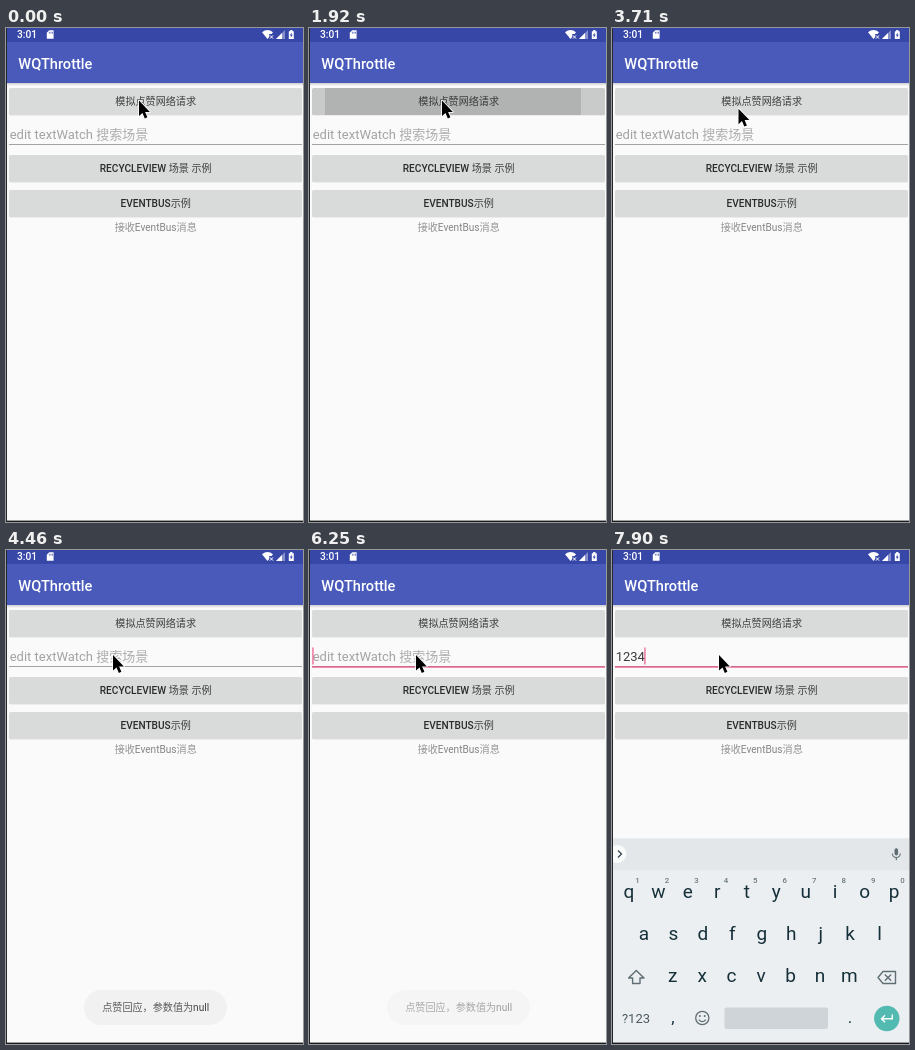
An HTML page for the animation above (8000 ms loop, 297 by 494 pixels).

```html
<!DOCTYPE html>
<html lang="zh-CN">
<head>
<meta charset="utf-8">
<style>
html, body { margin: 0; width: 100%; height: 100%; overflow: hidden; background: #fafafa; }
svg { display: block; width: 100vw; height: 100vh; }
text { font-family: Roboto, "Noto Sans CJK SC", "Noto Sans CJK", sans-serif; white-space: pre; }
.cjk { font-weight: 300; fill-opacity: .88; }
</style>
</head>
<body>
<svg id="stage" viewBox="0 0 297 494" preserveAspectRatio="none"></svg>
<script>
const LOOP = 8000, STEP = 149, LEAD = 20;
const INK = '#16303a', GREY = '#5f6d74', PINK = '#ea4a80';
const BUTTON = { x: 3, w: 293, h: 27 };
const KEY_GAP = 29.45, DIGIT = 7.25;

const text = (s, x, y, size, fill, o = '') =>
  `<text x="${x}" y="${y}" font-size="${size}" fill="${fill}" ${o}>` +
  s.replace(/[\u3000-\u9fff\uff00-\uffef]+/g, m => `<tspan class="cjk">${m}</tspan>`) + '</text>';
const mid = (s, x, y, size, fill, o = '') => text(s, x, y, size, fill, 'text-anchor="middle" ' + o);
const rect = (x, y, w, h, fill, o = '') =>
  `<rect x="${x}" y="${y}" width="${w}" height="${h}" fill="${fill}" ${o}/>`;
const disc = (x, y, r, fill, o = '') => `<circle cx="${x}" cy="${y}" r="${r}" fill="${fill}" ${o}/>`;
const path = (d, fill, o = '') => `<path d="${d}" fill="${fill}" ${o}/>`;
const line = (d, color, w, o = '') => path(d, 'none', `stroke="${color}" stroke-width="${w}" ${o}`);

function button(y, label, inks = '') {
  const { x, w, h } = BUTTON;
  return rect(x, y + 1, w, h, '#000', 'rx="2" opacity=".05"') +
    rect(x, y, w, h, '#d9dada', 'rx="1.5"') + inks +
    mid(label, 149.7, y + 16.6, 10.1, '#2a2a2a', 'font-weight="500"');
}

function statusBar() {
  return rect(0, 0, 297, 14, '#3747a8') +
    text('3:01', 11, 10.3, 10.2, '#fff', 'font-weight="500"') +
    path('M43.2 2.3H47.6V10.8H40.8V4.7Z', '#fff') +
    line('M43.4 3.8V5.6M45 3.8V5.6M46.5 3.8V5.6', '#3747a8', .7) +
    path('M256 4.2Q261.5 0 267 4.2L265.6 6H263.2V9L261.5 11Z', '#fff') +
    line('M264 7.4L267 10.6M267 7.4L264 10.6', '#fff', 1) +
    path('M279 2V11H270Z', '#fff', 'opacity=".4"') + path('M276 5V11H270Z', '#fff') +
    path('M282.8 3.2H284.2V2H286.4V3.2H287.8V11H282.8Z', '#fff') +
    path('M285.8 4.6L283.7 7.6H285L284.6 9.8L286.8 6.7H285.5Z', '#3747a8');
}

function keyboard() {
  const row = (chars, x, y, size = 19, fill = INK, o = '') =>
    [...chars].map((c, i) => mid(c, x + i * KEY_GAP, y, size, fill, o)).join('');
  const words = ['thanks', 'I', 'we'].map((w, i) => mid(w, 66 + i * 82.5, 309, 13.2, GREY)).join('');
  return rect(0, 288.5, 297, 206, '#eceff1') +
    rect(0, 288.5, 297, 31.5, '#e3e7ea') +
    disc(5.5, 304, 9, '#fafbfb') +
    line('M6 300.5L9.5 304L6 307.5', '#37474f', 1.3) +
    `<g id="words">${words}${line('M105.5 295V313M190 295V313', '#d2d7da', 1)}</g>` +
    rect(282.5, 298.2, 3.6, 7.2, GREY, 'rx="1.8"') +
    line('M280.3 303.5A4 4 0 0 0 288.3 303.5M284.3 307.5V310.3', GREY, 1.1) +
    row('1234567890', 25.5, 332.7, 7.8, '#6b7980', 'font-weight="500"') +
    row('qwertyuiop', 17, 347.7) + row('asdfghjkl', 32, 389.7) + row('zxcvbnm', 60.7, 432.2) +
    line('M24.3 420.5L32 428H28V433.5H20.6V428H16.6Z', GREY, 1.4, 'stroke-linejoin="round"') +
    line('M271 421.5H283.5V433.5H271L266 427.5Z', GREY, 1.4, 'stroke-linejoin="round"') +
    line('M272.8 424.4L279.2 430.7M279.2 424.4L272.8 430.7', GREY, 1.4) +
    mid('?123', 24, 472.7, 13, '#4a5960') +
    mid(',', 61, 473, 17, INK) + mid('.', 238, 473, 17, INK) +
    disc(90.3, 468, 6.6, 'none', `stroke="${GREY}" stroke-width="1.3"`) +
    disc(87.9, 466, 1, GREY) + disc(92.7, 466, 1, GREY) +
    line('M86.8 469.6Q90.3 473.8 93.8 469.6', GREY, 1.3) +
    rect(112.5, 457.5, 103.5, 21.5, '#ced4d7', 'rx="2"') +
    disc(274.8, 468.5, 12.7, '#52bab0') +
    line('M280.3 464.6V468.7H269.8M273 465.2L269.5 468.7L273 472.2', '#fff', 1.4);
}

const ink = id => rect(0, 60, 0, BUTTON.h, '#000', `id="${id}"`);

const stage = document.getElementById('stage');
stage.innerHTML =
  `<defs><clipPath id="face">${rect(BUTTON.x, 60, BUTTON.w, BUTTON.h, '#000', 'rx="1.5"')}</clipPath>
  <linearGradient id="shade" x2="0" y2="1"><stop stop-opacity=".18"/><stop offset="1" stop-opacity="0"/></linearGradient></defs>` +
  rect(0, 0, 297, 494, '#fafafa') +
  rect(0, 14, 297, 41, '#495abb') + rect(0, 55, 297, 3, 'url(#shade)') +
  statusBar() +
  text('WQThrottle', 12.3, 41, 14.6, '#fff', 'font-weight="500"') +
  button(60, '模拟点赞网络请求', `<g clip-path="url(#face)">${ink('hold')}${ink('ripple')}</g>`) +
  button(127, 'RECYCLEVIEW 场景 示例') +
  button(162, 'EVENTBUS示例') +
  mid('接收EventBus消息', 149.7, 203.4, 10.1, '#858585') +
  text('edit textWatch 搜索场景', 3.7, 111.2, 13, '#a3a3a3', 'id="hint"') +
  text('', 3.7, 111.2, 13, '#3a3a3a', 'id="typed"') +
  rect(3, 116.2, 293, .8, '#8e8e8e') +
  rect(3, 116.4, 293, 1.2, PINK, 'id="under"') +
  rect(3.4, 97.5, 1.1, 17, PINK, 'id="caret"') +
  `<g id="toast">${rect(78, 440, 143, 35, '#f1f1f1', 'rx="17.5"')}${mid('点赞回应，参数值为null', 149.7, 461.3, 10.1, '#444')}</g>` +
  `<g id="keys">${keyboard()}</g>` +
  rect(0, 0, 1, 494, '#26262b') + rect(0, 492.6, 297, 1.4, '#1b1b1e') +
  path('M0 0V15.6L3.5 12.4L5.8 17.9L8.4 16.8L6.1 11.4H10.9Z', '#000',
    'id="mouse" stroke="#fff" stroke-width="1.6" stroke-linejoin="round" paint-order="stroke"');

const el = {};
stage.querySelectorAll('[id]').forEach(e => el[e.id] = e);
const set = (id, attrs) => { for (const k in attrs) el[id].setAttribute(k, attrs[k]); };
const ramp = (s, a, b) => Math.min(1, Math.max(0, (s - a) / (b - a)));
const mix = (a, b, p) => a + (b - a) * p;

const KEY_STEPS = [46, 47, 49, 53];
const FOCUS = 35;

function spread(id, center, half, opacity) {
  half = Math.max(0, half);
  set(id, { x: center - half, width: 2 * half, opacity });
}

// The screen advances in whole steps of STEP ms
function draw(t) {
  const s = Math.floor((t + LEAD) / STEP);

  const release = 1 - ramp(s, 19, 22);
  spread('hold', 148.5, 149 * ramp(s, 3, 6), .075 * release);
  spread('ripple', 144, 32 * (s < 19 ? Math.min(s, 13) - 9 : 5), .12 * release);

  const move = ramp(s, 24, 28);
  set('mouse', { transform: `translate(${mix(133, 107, move)} ${mix(72.5, 105, move)})` });
  set('toast', { opacity: ramp(s, 27, 30) * (1 - ramp(s, 41, 43)) });

  const n = KEY_STEPS.filter(k => k <= s).length;
  const blink = s % 12;
  const lit = s >= FOCUS && (blink < 4 || blink > 5 || KEY_STEPS.includes(s));
  set('under', { opacity: ramp(s, FOCUS - 1, FOCUS + 1) });
  set('caret', { x: 3.4 + n * DIGIT, opacity: +lit });
  el.typed.textContent = '1234'.slice(0, n);
  set('hint', { opacity: n ? 0 : 1 });
  set('words', { opacity: n ? 0 : 1 });
  set('keys', { transform: `translate(0 ${mix(206, 0, ramp(s, 42, 44))})` });
}

const start = performance.now();
function tick() {
  draw((performance.now() - start) % LOOP);
  requestAnimationFrame(tick);
}
tick();
</script>
</body>
</html>
```
